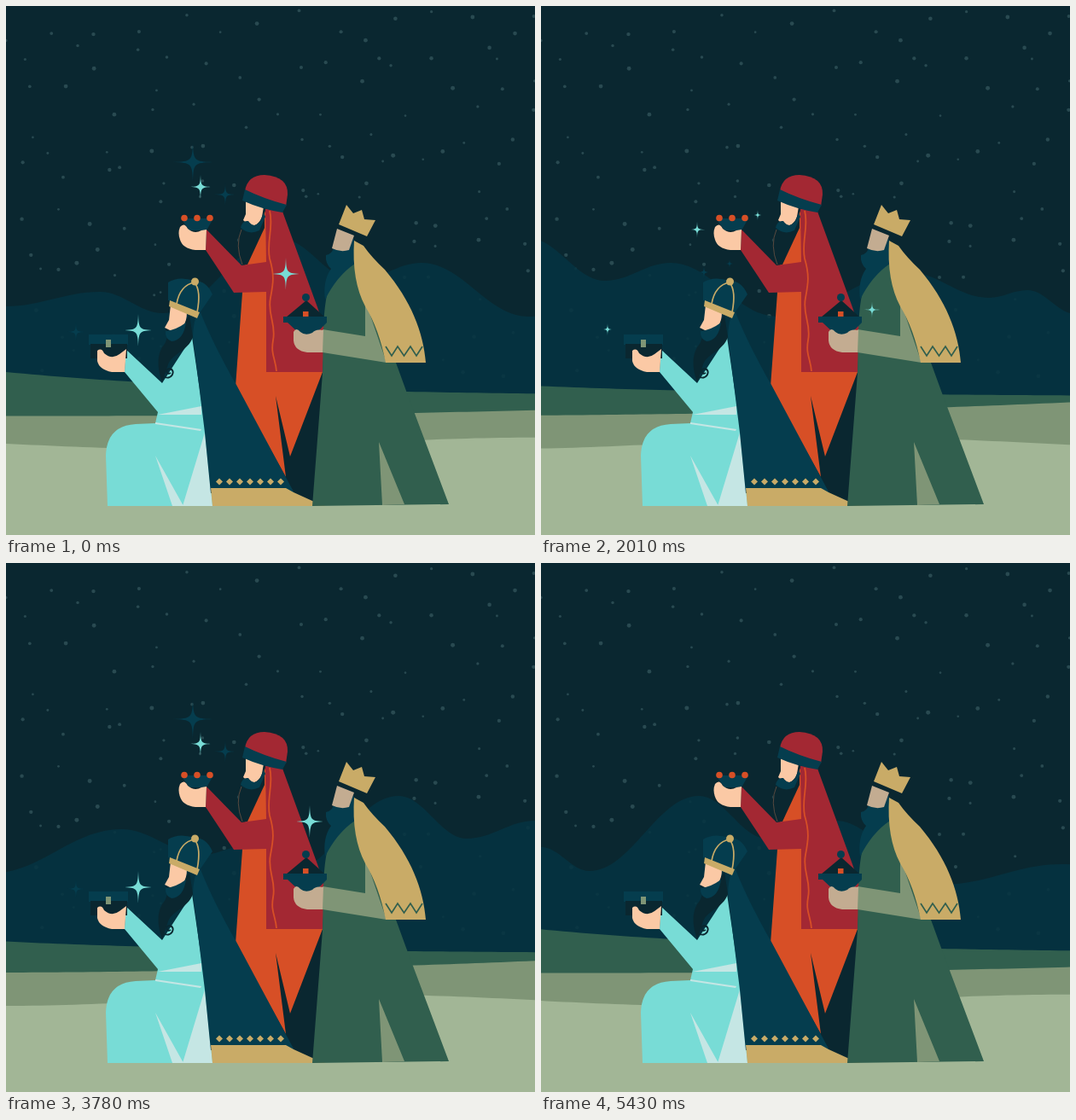
Write an HTML page that moves like this. It is 620 by 620 pixels and loops after 5.46 s.

```html
<!DOCTYPE html>
<html lang="en">
<head>
<meta charset="utf-8">
<title>Three travellers at night</title>
<style>
html, body { margin: 0; height: 100%; overflow: hidden; background: #0a2730 }
svg { display: block; width: 100vw; height: 100vh }
.night { fill: #0a2730 } .navy { fill: #053d4e } .teal { fill: #78dcd6 } .ice { fill: #c5e6e4 }
.gold { fill: #c9ab67 } .skin { fill: #fbc9a5 } .tan { fill: #c3ac91 } .red { fill: #a32833 }
.orange { fill: #d74f26 } .green { fill: #315f4e } .olive { fill: #7f9576 } .pale { fill: #a2b696 }
.line { fill: none }
</style>
</head>
<body>
<svg viewBox="0 0 620 620">
  <defs><path id="spark" d="M0-1C.03-.07 .07-.03 1 0C.07 .03 .03 .07 0 1C-.03 .07-.07 .03-1 0C-.07-.03-.03-.07 0-1z"/></defs>
  <g id="dots" fill="#294a51"></g>
  <path id="comet" fill="#6ccbc8"/>
  <path id="hills" fill="#053442" opacity=".86"/>
  <path id="far" class="green"/>
  <path id="mid" class="olive"/>
  <path id="near" class="pale"/>

  <!-- standing figure in red -->
  <path class="night" d="M300 450L372 425L362 584L300 575z"/>
  <path class="orange" d="M304 240L284 300L278 306L277 336L269 446L328 552L316 457L333 528L371 429L330 300z"/>
  <path class="night" d="M277 258Q266 280 277 304L283 303L303 260V243z"/>
  <path class="line" d="M276 262Q268 280 277 303" stroke="#6b5444" stroke-width=".8"/>
  <path class="red" d="M304 238H323L365 353L374 380L371 429H305V335L267 336L234 286L235 262L276 304L305 300z"/>
  <path class="line" d="M309 240C314 258 305 276 309 296C315 316 313 326 310 342C306 362 317 372 313 392C310 408 316 414 317 428" stroke="#d74f26" stroke-width="1.8"/>
  <path class="skin" d="M281 228L302 235L300 247Q296 258 286 258L278 251L281 244z"/>
  <path class="navy" d="M275 260Q277 251 284 252Q291 262 298 252L302 242L304 247L297 263Q285 269 275 260z"/>
  <path class="red" d="M280 217Q283 198 303 198Q331 200 330 221L328 235z"/>
  <path class="navy" d="M280 215Q302 226 329 233L324 242Q299 238 277 228z"/>
  <path class="navy" d="M205 249H243L235 263H215z"/>
  <g class="orange"><circle cx="209" cy="248.500" r="3.800"/><circle cx="224" cy="248.500" r="3.800"/><circle cx="239" cy="248.500" r="3.800"/></g>
  <path class="skin" d="M204 259Q209 253 213 261Q221 268 229 263L235 262L234 286H222Q207 284 204 274Q201 266 204 259z"/>

  <!-- kneeling figure -->
  <path class="teal" d="M140 402L183 442L218 388L230 470L235 500L242 586H119L117 527Q118 492 152 490L175 489L178 476L139 429z"/>
  <path class="ice" d="M178 479L229 469V479zM175 488L229 496L228 498L175 490zM175 527L208 586H195zM233 500L242 586H207z"/>
  <path class="navy" d="M219 387Q220 362 228 359C238 385 255 418 270 444L338 571H240L233 500z"/>
  <path class="gold" d="M240 565H328L337 570L359 580L375 586H242z"/>
  <path id="hem" class="gold"/>
  <path class="night" d="M187 378Q205 379 215 362L219 388C213 405 195 407 190 420L183 441Q174 415 183 400Q192 390 187 378z"/>
  <path class="line" d="M184 434C194 440 200 427 192 425C186 425 188 433 193 430" stroke="#0a2730" stroke-width="2"/>
  <path class="skin" d="M193 350L212 359Q212 380 194 381L186 377L191 368z"/>
  <path class="navy" d="M187 381Q199 380 211 371Q208 392 194 393Q186 390 187 381z"/>
  <path class="navy" d="M190 345V324Q202 316 221 322Q235 322 242 338L226 361z"/>
  <path class="gold" d="M192 345L227 359L224 366L191 352z"/>
  <path class="line" d="M200 349Q204 327 221 324Q229 334 224 359" stroke="#c9ab67" stroke-width="1.700"/>
  <circle class="gold" cx="221.500" cy="323" r="4.500"/>
  <path class="navy" d="M97 385H143V397H97z"/>
  <path class="night" d="M99 396H142V413H99z"/>
  <path class="olive" d="M117 391h6v9h-6z"/>
  <path class="skin" d="M107 404Q112 400 115 407Q124 415 133 408L141 402L139 429H124Q109 426 107 416z"/>

  <!-- standing figure in green -->
  <path class="green" d="M409 275L382 318Q373 340 372 380L371 430L359 586L519 584L469 451L457 418L425 330z"/>
  <path class="olive" d="M437 511L467 584L441 585zM371 379L421 387V345L446 418L371 406z"/>
  <path class="navy" d="M375 292Q382 291 384 283Q400 288 407 272L409 277V302Q388 316 374 344Q371 322 381 308Q374 302 375 292z"/>
  <path class="gold" d="M408 275L419 281Q428 294 444 309C475 346 489 382 492 418H445Q437 378 421 352Q405 322 408 275z"/>
  <path class="line" d="M445 399L452 410L459 399L466.500 410L474 399L481 410L488 399" stroke="#315f4e" stroke-width="1.700"/>
  <path class="night" d="M390 255L424 269L419 278L388 264z"/>
  <path class="tan" d="M388 261L408 269L402 286Q392 289 382 284z"/>
  <path class="gold" d="M399 233L407 243L417 239L420 250L433 251L423 270L390 256z"/>
  <path class="night" d="M328 365L352 345L374 365z"/>
  <path class="navy" d="M325 364H376V371L362 385H345L330 371H325z"/>
  <path class="orange" d="M348 358h6.500v6h-6.500z"/>
  <circle class="navy" cx="351.500" cy="341.500" r="4.500"/>
  <path class="tan" d="M337 382Q340 376 345 382Q351 387 359 383Q363 378 372 380L371 406H353Q338 404 337 392z"/>

  <!-- data-on lists the twinkle stages in which a group is lit -->
  <g data-on="0456" class="navy">
    <use href="#spark" transform="translate(219 183)scale(23)"/>
    <use href="#spark" transform="translate(82 382)scale(11)"/>
  </g>
  <g data-on="01456" class="teal">
    <use href="#spark" transform="translate(228 212)scale(14)"/>
    <use href="#spark" transform="translate(155 380)scale(19)"/>
    <use href="#spark" transform="translate(257 221)scale(13)" class="navy"/>
  </g>
  <g data-on="12" class="teal">
    <use href="#spark" transform="translate(254 245)scale(6)"/>
    <use href="#spark" transform="translate(183 262)scale(9.500)"/>
    <use href="#spark" transform="translate(78 379)scale(7)"/>
    <use href="#spark" transform="translate(388 356)scale(9.500)"/>
  </g>
  <g data-on="2" class="navy">
    <use href="#spark" transform="translate(191 312)scale(8)"/>
    <use href="#spark" transform="translate(221 302)scale(6)"/>
  </g>
  <g data-on="1"><use href="#spark" transform="translate(349 338)scale(8)" class="night"/></g>
  <g class="teal">
    <use data-on="4" href="#spark" transform="translate(356 303)scale(19)"/>
    <use data-on="5" href="#spark" transform="translate(302 362)scale(19)"/>
    <use data-on="06" href="#spark" transform="translate(328 314)scale(19)"/>
    <use data-on="1" href="#spark" transform="translate(311 351)scale(19)"/>
  </g>
</svg>
<script>
const LOOP = 5460, STEP = 30, WIDTH = 620;
const TWINKLE = 559, STAGE_ENDS = [110, 322, 380, 405, 475, 540, TWINKLE];
const $ = id => document.getElementById(id);

let seed = 7;
const random = () => (seed = seed * 16807 % 2147483647) / 2147483647;

// Speckled sky: one dot per jittered grid cell
const CELL = 44;
for (let y = 0; y < 450; y += CELL)
  for (let x = 0; x < WIDTH; x += CELL)
    $('dots').innerHTML += `<circle cx="${x + random() * CELL}" cy="${y + random() * CELL}" r="${1.3 + random() * 1.2}"/>`;

$('hem').setAttribute('d', [...Array(7).keys()].map(i => `M${250 + 12 * i} 553.500l4 4l-4 4l-4-4z`).join(''));

// Hills ease from one crest or dip to the next
const turns = [[0, 352], [110, 335], [184, 360], [320, 272], [410, 322], [487, 301], [612, 364], [765, 312],
  [860, 342], [905, 333], [962, 361], [1090, 273], [1170, 323], [1250, 302], [1375, 377], [1515, 353], [1600, 360]];
$('hills').setAttribute('d', 'M0 640V352' + turns.slice(1).map(([x, y], i) => {
  const [x0, y0] = turns[i], pull = (x - x0) * .38;
  return `C${x0 + pull} ${y0} ${x - pull} ${y} ${x} ${y}`;
}).join('') + 'V640z');

// Ground layers, each a height formula over its width
const ground = {
  far: x => 458 - 29 * Math.exp(-x / 300),
  mid: x => 480.5 - 20.5 * (x / 960) ** 2.5,
  near: x => 512.4 + 6.7 * Math.cos((x - 200) / 134)
};
for (const id in ground) {
  let d = 'M0 640';
  for (let x = 0; x <= 980; x += 10) d += `L${x} ${ground[id](x)}`;
  $(id).setAttribute('d', d + 'V640z');
}

const slide = (id, x) => $(id).setAttribute('transform', `translate(${-x} 0)`);

// A comet enters at the right edge at height y, then fades as it flies left
const FLIGHT = 590, comets = [{ start: 550, y: 64 }, { start: 2597, y: 187 }];

function drawComet(t) {
  const comet = comets.find(c => t >= c.start && t < c.start + FLIGHT);
  $('comet').style.display = comet ? '' : 'none';
  if (!comet) return;
  const age = t - comet.start, gone = age * .58;
  $('comet').setAttribute('opacity', .78 * (1 - age / FLIGHT));
  $('comet').setAttribute('d', `M${WIDTH - gone} ${comet.y + gone * .07}l95-9l165-14v10l-165 7l-85 7.500l-10 .5z`);
}

function draw(now) {
  const t = Math.floor(now % LOOP / STEP) * STEP;
  slide('hills', t / 6);
  for (const id in ground) slide(id, Math.min(t, LOOP - t) / 8);
  drawComet(t);
  const stage = STAGE_ENDS.findIndex(end => t % TWINKLE < end);
  for (const node of document.querySelectorAll('[data-on]'))
    node.style.display = node.dataset.on.includes(stage) ? '' : 'none';
}

const begin = performance.now();
function tick() {
  draw(performance.now() - begin);
  requestAnimationFrame(tick);
}
tick();
</script>
</body>
</html>
```
